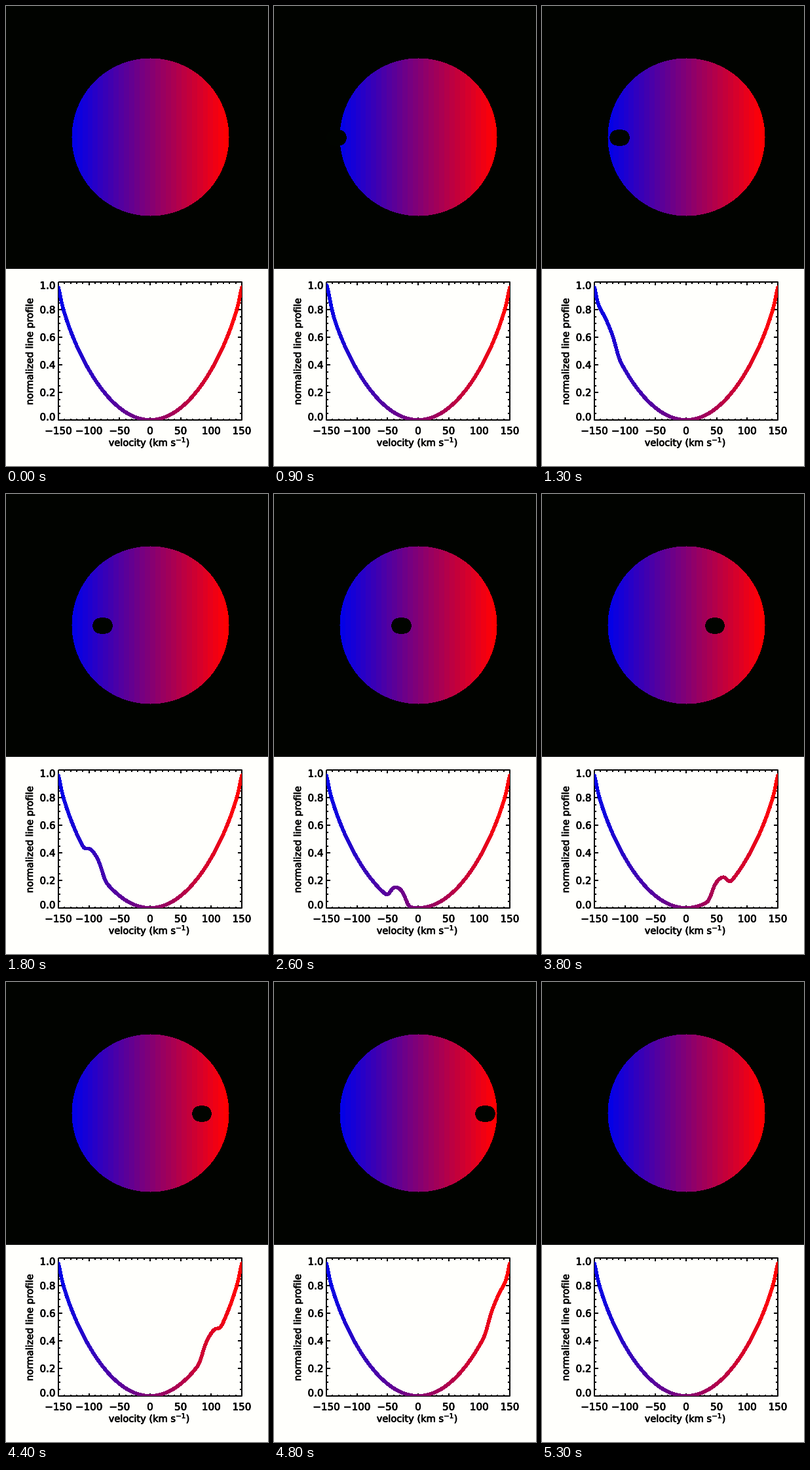
Animation of 400x700 px, one loop 6.2 s. Source, as a matplotlib script:

```python
import numpy as np
import matplotlib.pyplot as plt
from matplotlib.animation import FuncAnimation
from matplotlib.collections import LineCollection
from matplotlib.patches import Rectangle
from matplotlib.patheffects import withStroke

plt.rcParams["font.family"] = "DejaVu Sans"
plt.rcParams["mathtext.fontset"] = "dejavusans"

W, H, SKY, DPI = 400, 700, 400, 100
PX = 72 / DPI                       # points per pixel
CX, CY, R = 220, 199.5, 120         # stellar disc
LEFT, RIGHT, TOP, BOTTOM = 80, 360, 420, 630
FRAMES, INTERVAL = 62, 100
FIRST, LAST = 9, 52                 # frames with the planet in transit
STEP, SPOT_R = 5.81, 11.7           # planet motion per frame, planet radius
LIMB = 0.63                         # limb darkening
BLUR = 0.016                        # line broadening, in disc radii
PAPER, NIGHT = "#fffffc", (0.004, 0.015, 0.0)

fig = plt.figure(figsize=(W / DPI, H / DPI), dpi=DPI, facecolor=PAPER)
ax = fig.add_axes([0, 0, 1, 1])
ax.axis("off")


def doppler(x):
    """Blue to red across the disc for x in -1..1, in small steps."""
    t = np.clip((np.floor((np.asarray(x) + 1) * 15) + 0.5) / 30, 0, 1)
    return np.stack([np.clip(1.03 * t, 0, 1), 0 * t, 0.92 * (1 - t)], axis=-1)


def line(x, y):
    ax.plot(x, y, color="black", lw=2 * PX, solid_capstyle="butt", zorder=3)


def label(x, y, s, size, **kw):
    ax.text(x, y, s, fontsize=size * PX, color="black", zorder=4,
            path_effects=[withStroke(linewidth=0.7 * PX, foreground="black")], **kw)


def to_x(v):
    return CX + v * (RIGHT - LEFT) / 300


def to_y(p):
    return BOTTOM - p * (BOTTOM - TOP)


# Star and planet
row, col = np.mgrid[:SKY, :W]
inside = np.hypot(col - CX, row + 0.5 - CY) <= R
sky = np.where(inside[..., None], doppler((col - CX) / R), NIGHT)
ax.imshow(sky, extent=(0, W, SKY, 0), interpolation="nearest",
          aspect="auto", zorder=1)
planet, = ax.plot([], [], color=NIGHT, lw=2 * SPOT_R * PX,
                  solid_capstyle="round", antialiased=False, zorder=2)

# Plot frame, ticks and labels
line([LEFT, RIGHT, RIGHT, LEFT, LEFT], [TOP, TOP, BOTTOM, BOTTOM, TOP])
for v in range(-140, 150, 10):
    size = 4.5 if v % 50 == 0 else 2.5
    for edge, sign in ((TOP, 1), (BOTTOM, -1)):
        line([to_x(v)] * 2, [edge, edge + sign * size])
for k in range(1, 20):
    size = 6 if k % 4 == 0 else 3
    for edge, sign in ((LEFT, 1), (RIGHT, -1)):
        line([edge, edge + sign * size], [to_y(k / 20)] * 2)

for v in range(-150, 151, 50):
    label(to_x(v), 651.5, str(v).replace("-", "\u2212"), 15.1, ha="center", va="baseline")
for k in range(6):
    mid = np.clip(to_y(k / 5), TOP + 5, BOTTOM - 5)
    label(75.5, mid + 5.5, f"{k / 5:.1f}", 15.1, ha="right", va="baseline")
label(219, 669.5, "velocity (km s$^{-1}$)", 14.6, ha="center", va="baseline")
label(41, 525.5, "normalized line profile", 14.6, rotation=90,
      rotation_mode="anchor", ha="center", va="baseline")

# Line profile from the flux in each vertical strip of the disc
xs = np.linspace(-1.1, 1.1, 1101)
chord = np.sqrt(np.clip(1 - xs**2, 0, None))
full = 2 * (1 - LIMB) * chord + LIMB * np.pi / 2 * chord**2
norm = full.max()
kx = np.arange(-40, 41) * (xs[1] - xs[0])
kernel = np.exp(-0.5 * (kx / BLUR) ** 2)
kernel /= kernel.sum()
shown = np.flatnonzero(np.abs(xs) <= 1.0001)[::2]
sweep = np.linspace(-0.5, 0.5, 9)[:, None] * STEP


def profile(center=None):
    flux = full
    if center is not None:
        # mean shadow while the planet moves by one step
        off = xs - (center + sweep - CX) / R
        half = np.sqrt(np.clip((SPOT_R / R) ** 2 - off**2, 0, None))
        half = np.minimum(half, chord).mean(axis=0)
        flux = full - 2 * half * (1 - LIMB + LIMB * chord)
    return 1 - np.convolve(flux, kernel, mode="same") / norm


curve = LineCollection([], linewidths=4.5 * PX, capstyle="round",
                       antialiaseds=False, zorder=5)
ax.add_collection(curve)
curve.set_clip_path(Rectangle((LEFT, TOP), RIGHT - LEFT, BOTTOM - TOP,
                              transform=ax.transData))
curve.set_color(doppler((xs[shown][1:] + xs[shown][:-1]) / 2))

ax.set_xlim(0, W)
ax.set_ylim(H, 0)


def draw(i):
    center = None
    if FIRST <= i <= LAST:
        center = CX + STEP * (i - (FIRST + LAST) / 2)
        reach = STEP / 2
        planet.set_data([center - reach, center + reach], [CY + 0.5, CY + 0.5])
    else:
        planet.set_data([], [])
    pts = np.column_stack([to_x(150 * xs), to_y(profile(center))])[shown]
    curve.set_segments(np.stack([pts[:-1], pts[1:]], axis=1))
    return planet, curve


anim = FuncAnimation(fig, draw, frames=FRAMES, interval=INTERVAL,
                     repeat=True, repeat_delay=0, blit=False)
plt.show()
```
